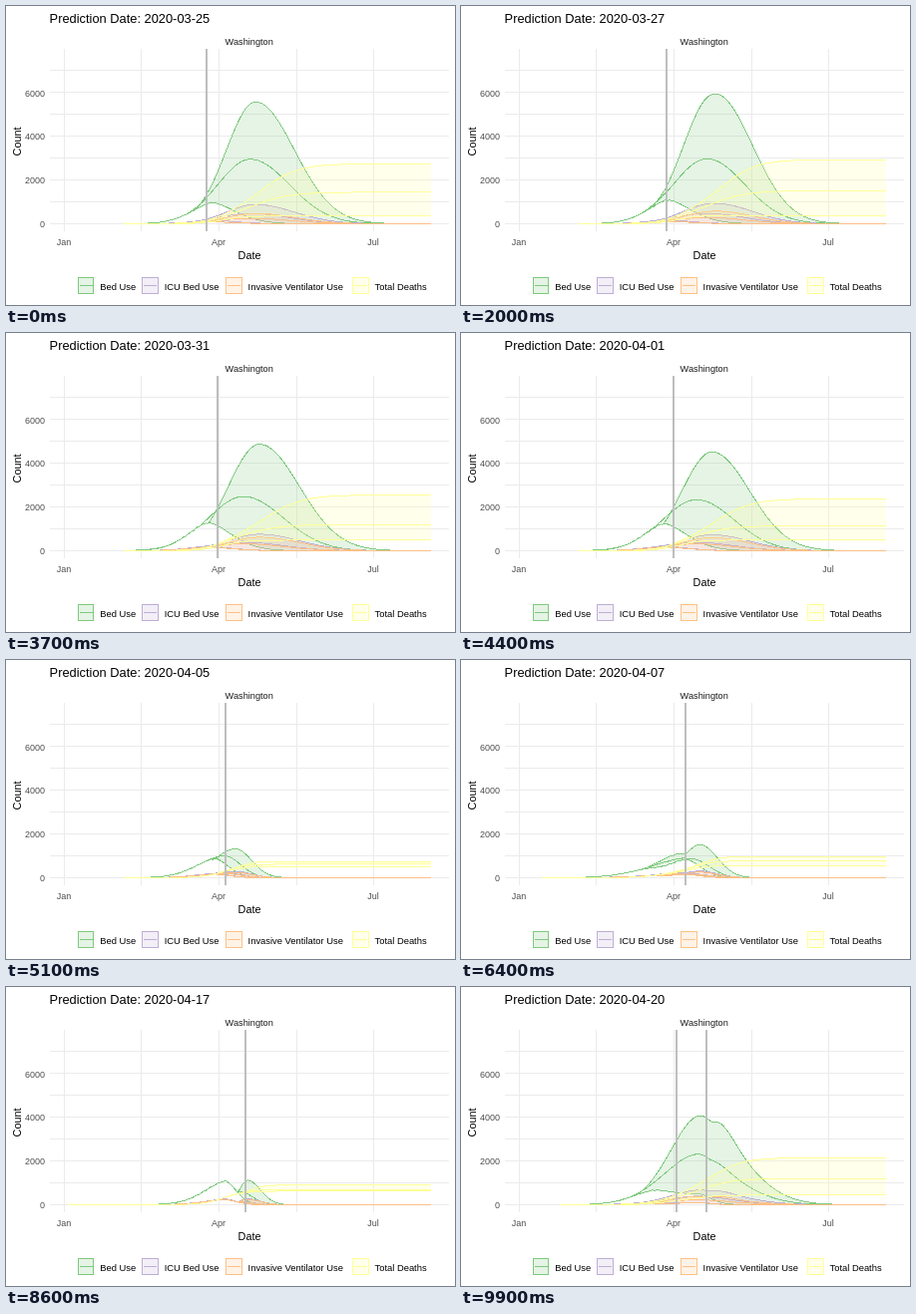
An HTML page for the animation above (10 s loop, 450x300 px).

```html
<!DOCTYPE html>
<html lang="en">
<head>
<meta charset="utf-8">
<title>Prediction by date</title>
<style>
html, body { margin: 0; width: 100%; height: 100%; overflow: hidden; background: #fff; }
svg { display: block; width: 450px; height: 300px; font-family: "Liberation Sans", Arial, sans-serif; }
</style>
</head>
<body>
<svg id="stage" viewBox="0 0 450 300"></svg>
<script>
const NS = 'http://www.w3.org/2000/svg';
const stage = document.getElementById('stage');
const SERIES = [
  { name: 'Bed Use', color: '#7FC97F', key: 72.2 },
  { name: 'ICU Bed Use', color: '#BEAED4', key: 136.7 },
  { name: 'Invasive Ventilator Use', color: '#FDC086', key: 220.6 },
  { name: 'Total Deaths', color: '#FFFF99', key: 347.5 }
];
const DEATHS = 3, END_X = 426, STEPS = 180, ZERO = 218.5, UNIT = 0.02195;

const mix = (a, b, p) => a + (b - a) * p;
const toY = v => ZERO - UNIT * v;

// Forecasts as low, mean, high: bed peaks [x, height] and death totals
const first = {
  peaks: [[207, 960], [245, 2950], [250, 5570]], dead: [350, 1440, 2740],
  rise: 29, fall: 39, share: [1, .158, .084]
};
const worst = {
  peaks: [[209, 1450], [251, 3050], [262.5, 7350]], dead: [480, 1690, 3500],
  rise: 32, fall: 34, share: [1, .155, .127]
};
const eased = {
  peaks: [[203, 1280], [238, 2480], [254, 4870]], dead: [480, 1200, 2550],
  rise: 31, fall: 40, share: [1, .155, .127]
};
const flat = {
  peaks: [[210, 870], [219, 1000], [230, 1320]], dead: [520, 620, 750],
  rise: 22, fall: 16, share: [1, .22, .185]
};
const rebound = {
  peaks: [[219, 1480], [224, 1400], [231, 2720]], dead: [640, 980, 1300],
  rise: 11, fall: 19, share: [1, .19, .16]
};
const late = {
  peaks: [[220, 1080], [234, 600], [242, 1120]], dead: [620, 690, 900],
  rise: 8, fall: 13, share: [1, .24, .215]
};

function blend(a, b, p) {
  if (typeof a === 'number') return mix(a, b, p);
  if (Array.isArray(a)) return a.map((v, i) => blend(v, b[i], p));
  return Object.fromEntries(Object.keys(a).map(k => [k, blend(a[k], b[k], p)]));
}

function bell([peak, height], rise, fall, power, x) {
  const z = Math.abs(x - peak) / (x < peak ? rise : fall);
  return height * Math.exp(-(z ** power) / 2);
}

const logistic = (x, c, w) => 1 / (1 + Math.exp((c - x) / w));

// Past use is slightly rough; forecasts never fall below the low curve
function beds({ peaks, rise, fall }, i, x) {
  const rough = x < peaks[0][0] ? .015 * (Math.sin(x * .93) + Math.sin(x * 2.3)) : 0;
  const low = bell(peaks[0], 20, Math.min(22, fall * .8), 1.7, x) * (1 + rough);
  if (i === 0) return low;
  return Math.max(low, bell(peaks[i], i === 1 ? rise * 1.13 : rise, fall, 2, x));
}

// Known deaths, then the extra deaths that follow the peak in bed use
function deaths({ peaks, dead, fall }, i, x) {
  return dead[0] * logistic(x, 218, 11) +
    (dead[i] - dead[0]) * logistic(x, peaks[i][0] + 6, fall * .46);
}

function sample(model, start, s, i) {
  return Array.from({ length: STEPS + 1 }, (_, n) => {
    const x = mix(start, END_X, n / STEPS);
    return [x, toY(s === DEATHS ? deaths(model, i, x) : model.share[s] * beds(model, i, x))];
  });
}

// Days count from 1 January
const STATES = [
  [84, first], [85, first], [86, first],
  [88, worst], [89, blend(worst, eased, .25)], [90, eased],
  [91, blend(eased, flat, .1)], [95, flat], [97, flat],
  [98, blend(flat, rebound, .6)], [100, rebound], [103, blend(rebound, late, .3)],
  [107, late], [110, blend(late, first, .05)]
].map(([day, model]) => ({
  date: new Date(Date.UTC(2020, 0, 1 + day)).toISOString().slice(0, 10),
  x: 57.06 + 1.705 * day,
  curves: SERIES.map((_, s) => [0, 1, 2].map(i => sample(model, day < 98 ? 118 : 62, s, i)))
}));

function add(tag, attrs, text) {
  const el = document.createElementNS(NS, tag);
  for (const k in attrs) el.setAttribute(k, attrs[k]);
  if (text) el.textContent = text;
  stage.appendChild(el);
  return el;
}
const label = (text, x, y, size, fill, anchor = 'start', more = {}) =>
  add('text', { x, y, 'font-size': size, fill, 'text-anchor': anchor, ...more }, text);

const crisp = { 'shape-rendering': 'crispEdges' };
const snap = v => Math.floor(v) + .5;
let grid = '';
for (let v = 0; v < 8000; v += 1000) grid += `M44 ${snap(toY(v))}H444`;
for (let i = 0; i < 5; i++) grid += `M${snap(58.2 + 77.6 * i)} 43V226`;
add('path', { d: grid, stroke: '#EBEBEB', fill: 'none', ...crisp });

const shapes = SERIES.map(({ color }) => ({
  area: add('path', { fill: color, 'fill-opacity': .2 }),
  lines: [0, 1, 2].map(() => add('path', { fill: 'none', stroke: color, ...crisp }))
}));

const marker = () => add('rect', { y: 43, width: 2, height: 183, fill: '#BEBEBE', ...crisp });
const leaving = marker(), current = marker();

const title = label('', 43.6, 17, 12.85, '#000');
label('Washington', 243.7, 39, 9.2, '#1A1A1A', 'middle');
for (let v = 0; v <= 6000; v += 2000) label(String(v), 39, toY(v) + 3.7, 9, '#4D4D4D', 'end');
['Jan', 'Apr', 'Jul'].forEach((m, i) => label(m, 58 + 155 * i, 240, 9, '#4D4D4D', 'middle'));
label('Date', 244, 254, 10.8, '#000', 'middle');
label('Count', 0, 0, 10.8, '#000', 'middle', { transform: 'translate(15 136) rotate(-90)' });

for (const { name, color, key } of SERIES) {
  const x = snap(key), width = snap(key + 15.6) - x;
  add('rect', { x, y: 272.5, width, height: 16, fill: color, 'fill-opacity': .2, stroke: color, ...crisp });
  add('path', { d: `M${x + 1.5} 280.5h13`, stroke: color, ...crisp });
  label(name, key + 22, 285, 9.4, '#000');
}

const toPath = pts => pts.map(([x, y]) => x.toFixed(2) + ' ' + y.toFixed(2)).join('L');
const placeMarker = (el, x) => el.setAttribute('x', Math.round(x));
const arrival = k => k < 2 ? 600 + 900 * k : 2300 + 700 * (k - 2);

function draw(time) {
  let k = 0;
  while (time >= arrival(k)) k++;
  const span = k === 2 ? 400 : 300;
  const p = Math.max(0, 1 - (arrival(k) - time) / span);
  const from = STATES[k], to = STATES[(k + 1) % STATES.length];

  title.textContent = 'Prediction Date: ' + from.date;
  placeMarker(current, mix(from.x, to.x, p));
  // the last marker stays in place while the loop returns
  placeMarker(leaving, from.x);
  leaving.style.display = k === STATES.length - 1 ? '' : 'none';

  shapes.forEach(({ area, lines }, s) => {
    const curves = blend(from.curves[s], to.curves[s], p);
    curves.forEach((c, i) => lines[i].setAttribute('d', 'M' + toPath(c)));
    area.setAttribute('d', 'M' + toPath(curves[2]) + 'L' + toPath(curves[0].reverse()) + 'Z');
  });
}

const begin = performance.now();
let shown = -1;
function tick() {
  const time = Math.floor((performance.now() - begin) % 10000 / 100) * 100;
  if (time !== shown) draw(shown = time);
  requestAnimationFrame(tick);
}
tick();
</script>
</body>
</html>
```
